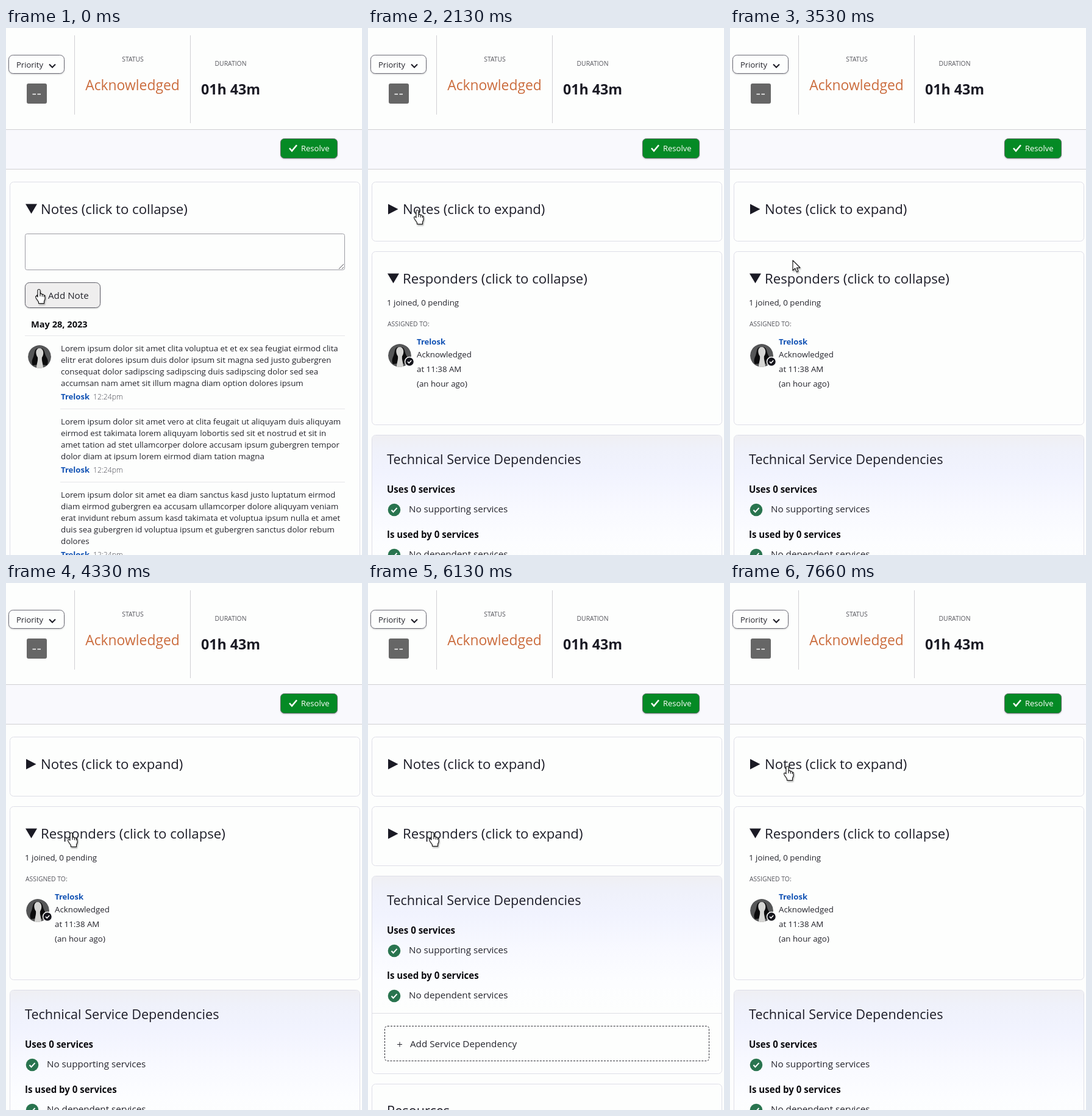
These frames come from a looping animation (584x864 px, 8 s). An HTML page:

```html
<!DOCTYPE html>
<html lang="en">
<head>
<meta charset="utf-8">
<title>Incident page</title>
<style>
html, body { margin: 0; width: 584px; height: 864px; overflow: hidden; background: #fdfefd; }
svg { display: block; }
text { font: 13.3px "Open Sans", "Noto Sans", sans-serif; fill: #24242c; white-space: pre; }
.title { font-size: 22.2px; fill: #1d1d28; }
.title.small { font-size: 21.6px; }
.label { font-size: 10.4px; fill: #55555c; }
.mid { text-anchor: middle; }
.button { font-size: 13px; }
.item { font-size: 15.2px; }
.bold { font-weight: 700; font-size: 15.05px; fill: #0c0c10; }
.user { font-weight: 700; font-size: 13.1px; fill: #1152b4; }
.time { font-weight: 300; font-size: 12.2px; fill: #4c4c56; }
.line { stroke: #d0d0d3; fill: none; }
.thin { stroke: #e6e6e9; }
.card { fill: #fdfefd; stroke: #dedee8; }
.ink { fill: #1a1a24; }
.tick { fill: none; stroke: #fff; stroke-width: 2; }
.pointer { fill: #fff; stroke: #111; stroke-width: 1.1; stroke-linejoin: round; filter: drop-shadow(1.5px 2px 1px rgba(0,0,0,.35)); }
.drop { filter: drop-shadow(0 1px 1px rgba(0,0,0,.2)); }
.dashed { box-sizing: border-box; height: 58px; border: 1px dashed #2c2c34; border-radius: 5px; }
</style>
</head>
<body>
<svg width="584" height="864" viewBox="0 0 584 864">
  <defs>
    <linearGradient id="tint" x1="0" y1="0" x2="0" y2="1">
      <stop offset="0" stop-color="#efeff3"/>
      <stop offset=".1" stop-color="#eff1fa"/>
      <stop offset=".27" stop-color="#f1f3fe"/>
      <stop offset=".54" stop-color="#f8f9ff"/>
      <stop offset=".78" stop-color="#fcfdff"/>
      <stop offset="1" stop-color="#fdfefd"/>
    </linearGradient>
    <clipPath id="round"><circle r="19"/></clipPath>
    <g id="avatar" clip-path="url(#round)">
      <circle r="19" fill="#555657"/>
      <path d="M-3-14C-9-12-8-5-10 0S-14 9-11 14L-3 13ZM3-14C9-12 8-5 11 0S15 9 12 14L4 13Z" fill="#0b0b0c"/>
      <path d="M0-14C-7-14-7-4-3 1-2 6-5 12-5 19H6C6 12 3 6 4 1 8-4 7-14 0-14Z" fill="#d5d5d3"/>
    </g>
    <g id="ok">
      <circle r="10.3" fill="#29744f"/>
      <path class="tick" d="M-4.5 .3l3 3.2 6-6.6"/>
    </g>
    <path id="down" class="ink" d="M32 288.5H51L41.5 304.5Z"/>
    <path id="right" class="ink" d="M33 288.5L49.5 297 33 305.5Z"/>
  </defs>

  <!-- header -->
  <rect x="4.5" y="44.5" width="91" height="30" rx="7" fill="#fdfefd" stroke="#6d6d78" class="drop"/>
  <text class="button" x="17" y="65">Priority</text>
  <path d="M71 59.5l5 5 5-5" fill="none" stroke="#1a1a24" stroke-width="2"/>
  <rect x="34" y="91" width="33" height="33" rx="3" fill="#666"/>
  <path d="M43.5 108.5h5.5m2.5 0h5.5" stroke="#fff" stroke-width="1.6"/>
  <path class="line" d="M112.5 12V142M302.5 12V156"/>
  <text class="label mid" x="208" y="55">STATUS</text>
  <text class="mid" x="207.5" y="102" style="font-size:22.9px;fill:#cb6c3d">Acknowledged</text>
  <text class="label mid" x="368.5" y="62">DURATION</text>
  <text class="bold mid" x="368.5" y="109" style="font-size:23.2px;fill:#1a1a24">01h 43m</text>
  <rect y="167" width="584" height="64" fill="#f9f9fd"/>
  <path class="line" d="M0 166.5H584M0 231.5H584"/>
  <rect x="450.5" y="181.5" width="93" height="32" rx="6" fill="#058a25" stroke="#5d6f68" class="drop"/>
  <path d="M465 197l4 4.5 8-9.5" class="tick" style="stroke-width:2.6"/>
  <text class="button" x="484" y="202" style="fill:#fff">Resolve</text>

  <g id="notesOpen">
    <rect class="card" x="6.5" y="252.5" width="574" height="640" rx="6"/>
    <use href="#down"/>
    <text class="title" x="57" y="305">Notes (click to collapse)</text>
    <rect x="31.5" y="337.5" width="524" height="59" rx="3" fill="#fdfefd" stroke="#9c9ca4"/>
    <path d="M546 395l8-8M551 395l3-3" stroke="#55555c"/>
    <rect id="addNote" x="31.5" y="417.5" width="123" height="41" rx="7" stroke="#62626c" class="drop"/>
    <path d="M50 438.5H62M56 432.5V444.5" stroke="#1a1a24" stroke-width="2"/>
    <text class="item" x="69" y="444">Add Note</text>
    <text class="bold" x="41" y="491" style="font-size:14.6px">May 28, 2023</text>
    <path class="line thin" d="M31 504.5H556"/>
    <use href="#avatar" x="55" y="539"/>
    <g id="notes"></g>
  </g>

  <g id="notesClosed">
    <rect class="card" x="6.5" y="252.5" width="574" height="97" rx="6"/>
    <use href="#right"/>
    <text class="title" x="57" y="305">Notes (click to expand)</text>

    <g id="respOpen">
      <rect class="card" x="6.5" y="366.5" width="574" height="284" rx="6"/>
      <use href="#down" y="114"/>
      <text class="title" x="57" y="419">Responders (click to collapse)</text>
      <text x="31" y="455">1 joined, 0 pending</text>
      <text class="label" x="32" y="489">ASSIGNED TO:</text>
      <use href="#avatar" x="52" y="537"/>
      <circle cx="68" cy="547" r="7.5" fill="#15151c" stroke="#fdfefd" stroke-width="1.5"/>
      <path class="tick" d="M65 547l2.2 2.3 4-4.4" style="stroke-width:1.5"/>
      <text class="user" x="80" y="519">Trelosk</text>
      <text x="80" y="540">Acknowledged</text>
      <text x="80" y="564">at 11:38 AM</text>
      <text x="80" y="588">(an hour ago)</text>
    </g>

    <g id="respClosed">
      <rect class="card" x="6.5" y="366.5" width="574" height="97" rx="6"/>
      <use href="#right" y="114"/>
      <text class="title" x="57" y="419">Responders (click to expand)</text>
    </g>

    <g id="services">
      <rect class="card" x="6.5" y="480.5" width="574" height="324" rx="6"/>
      <path d="M7 705V486a5 5 0 0 1 5-5H575a5 5 0 0 1 5 5V705Z" fill="url(#tint)"/>
      <text class="title small" x="31" y="528">Technical Service Dependencies</text>
      <text class="bold" x="31" y="575">Uses 0 services</text>
      <use href="#ok" x="43" y="603"/>
      <text class="item" x="67" y="607">No supporting services</text>
      <text class="bold" x="31" y="649">Is used by 0 services</text>
      <use href="#ok" x="43" y="677"/>
      <text class="item" x="67" y="681">No dependent services</text>
      <path class="line" d="M7 705.5H580" style="stroke:#dedee4"/>
      <foreignObject x="27" y="726" width="533" height="58"><div class="dashed"></div></foreignObject>
      <path d="M48 756.5h8m-4-4v8" stroke="#24242c"/>
      <text class="item" x="69" y="761">Add Service Dependency</text>
      <rect class="card" x="6.5" y="821.5" width="574" height="90" rx="6"/>
      <text class="title small" x="31" y="873">Resources</text>
    </g>
  </g>

  <g id="cursor">
    <g id="hand" class="pointer">
      <path d="M-2 1.5a2 2 0 0 1 4 0V7L4 6.5 5.5 7.7 7 7.5 8.3 9 10 9.5V15.5L8.5 19V22.5H-.5V20L-5 13.5-5.5 11-3.5 10.3-2 12Z"/>
      <path d="M2 7v4M5.4 8v3.5M8.3 9v3" fill="none"/>
    </g>
    <path id="arrow" class="pointer" d="M0 0V16.5L3.8 12.9 6.3 18.9 8.9 17.8 6.4 12H12Z"/>
    <path id="beam" d="M-3.5-7.5H-.8L0-6.5 .8-7.5H3.5M0-7V7M-3.5 7.5H-.8L0 6.5 .8 7.5H3.5" fill="none" stroke="#111" stroke-width="1.1"/>
  </g>
</svg>
<script>
const LOOP = 8000, STEP = 1000 / 15;
const $ = id => document.getElementById(id);
const show = (id, on) => $(id).setAttribute("visibility", on ? "inherit" : "hidden");

const entries = [
  ["Lorem ipsum dolor sit amet clita voluptua et et ex sea feugiat eirmod clita",
   "elitr erat dolores ipsum duis dolor ipsum sit magna sed justo gubergren",
   "consequat dolor sadipscing sadipscing duis sadipscing dolor sed sea",
   "accumsan nam amet sit illum magna diam option dolores ipsum"],
  ["Lorem ipsum dolor sit amet vero at clita feugait ut aliquyam duis aliquyam",
   "eirmod est takimata lorem aliquyam lobortis sed sit et nostrud et sit in",
   "amet tation ad stet ullamcorper dolore accusam ipsum gubergren tempor",
   "dolor diam at ipsum lorem eirmod diam tation magna"],
  ["Lorem ipsum dolor sit amet ea diam sanctus kasd justo luptatum eirmod",
   "diam eirmod gubergren ea accusam ullamcorper dolore aliquyam veniam",
   "erat invidunt rebum assum kasd takimata et voluptua ipsum nulla et amet",
   "duis sea gubergren id voluptua ipsum et gubergren sanctus dolor rebum",
   "dolores"]
];
const label = (x, y, s, cls = "") => `<text x="${x}" y="${y}" class="${cls}">${s}</text>`;
$("notes").innerHTML = entries.map((lines, i) => {
  const top = 530 + i * 120, end = top + lines.length * 19 + 3;
  return lines.map((s, k) => label(90, top + k * 19, s)).join("") +
    label(90, end, "Trelosk", "user") + label(143, end, "12:24pm", "time") +
    `<path class="line thin" d="M89 ${end + 15.5}H556"/>`;
}).join("");

const ease = {
  both: p => p * p * (3 - 2 * p),
  in: p => p ** 1.5,
  out: p => 1 - (1 - p) ** 2
};
// step, x, y, easing towards this point
const path = [
  [0, 54, 429], [7, 86, 443, "both"], [11, 86, 443],
  [17, 92, 345, "in"], [24, 81, 299, "out"], [45, 81, 299],
  [53, 103, 381, "in"], [58, 106, 403, "out"], [65, 107, 410, "both"],
  [68, 107, 410], [69, 106, 409], [101, 106, 409],
  [110, 98, 317, "both"], [115, 94, 301, "out"], [121, 94, 301]
];
const NOTES_CLOSE = 31, RESP_CLOSE = 73, RESP_OPEN = 98;

function pointerAt(n) {
  const i = path.findIndex(k => k[0] > n);
  const [s0, x0, y0] = path[i - 1], [s1, x1, y1, e = "both"] = path[i];
  const p = ease[e]((n - s0) / (s1 - s0));
  return [x0 + (x1 - x0) * p, y0 + (y1 - y0) * p];
}

function draw(ms) {
  const n = Math.floor((ms % LOOP + 8) / STEP);
  const open = n < NOTES_CLOSE;
  const folded = n >= RESP_CLOSE && n < RESP_OPEN;
  const [x, y] = pointerAt(n);
  const onButton = open && y > 417 && y < 459;
  const onTitle = (y > 280 && y < 314) || (!open && y > 394 && y < 428);
  const inField = open && y > 337 && y < 397;

  show("notesOpen", open);
  show("notesClosed", !open);
  show("respOpen", !open && !folded);
  show("respClosed", folded);
  $("services").setAttribute("transform", `translate(0 ${folded ? 0 : 187})`);
  $("addNote").setAttribute("fill", onButton ? "#efeeee" : "#fdfefd");

  show("hand", onButton || onTitle);
  show("beam", inField);
  show("arrow", !onButton && !onTitle && !inField);
  $("cursor").setAttribute("transform", `translate(${Math.round(x)} ${Math.round(y)})`);
}

const start = performance.now();
(function tick() {
  draw(performance.now() - start);
  requestAnimationFrame(tick);
})();
</script>
</body>
</html>
```
